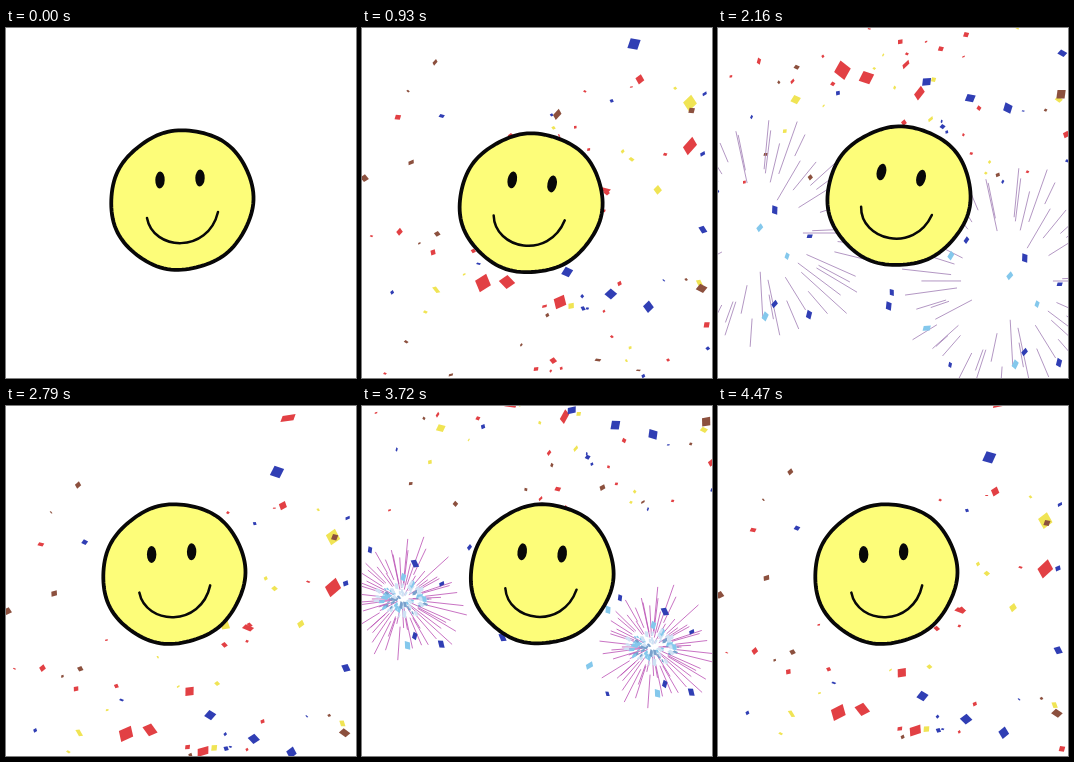
Animation, 350 px wide and 350 px high, one loop 4.5 s. Source, as an HTML page with a canvas:

```html
<!DOCTYPE html>
<html>
<head>
<meta charset="utf-8">
<title>Smiley party</title>
<style>
  html, body { margin: 0; width: 100%; height: 100%; overflow: hidden; background: #fff; }
  canvas { display: block; }
</style>
</head>
<body>
<canvas id="stage" width="350" height="350"></canvas>
<script>
const ctx = document.getElementById('stage').getContext('2d');
const LOOP = 4500, STEP = 30, SWAY = 1680, PARTY = 1720;
const TAU = Math.PI * 2;
const RED = [226, 64, 68], YELLOW = [240, 228, 84], BLUE = [48, 62, 180], BROWN = [140, 80, 62];
const SKY = [132, 200, 236], ICE = [206, 226, 244], STEEL = [120, 160, 204], DUST = [95, 75, 72];

const rgb = c => `rgb(${c.map(Math.round).join()})`;
const mix = (a, b, k) => a.map((v, i) => v + (b[i] - v) * k);
const clamp = v => Math.max(0, Math.min(1, v));
const polar = (a, r) => [Math.cos(a) * r, Math.sin(a) * r];

function seeded(seed) {
  return () => (seed = seed * 16807 % 2147483647) / 2147483647;
}
const make = (count, seed, build) => {
  const rand = seeded(seed);
  return Array.from({ length: count }, (_, i) => build(rand, i));
};

function flake(x, y, size, color, angle, flat) {
  ctx.save();
  ctx.translate(x, y);
  ctx.rotate(angle);
  ctx.transform(1, 0.15, -0.3, flat, 0, 0);
  ctx.fillStyle = rgb(color);
  ctx.fillRect(-size / 2, -size / 2, size, size);
  ctx.restore();
}

// Places are those at 930 ms into the party
const paper = (rand, x, y, size, color) => ({
  x, y, size, color,
  speed: 0.5 + size * 0.02 + y / 900,
  angle: rand() * 2 - 1, spin: rand() * 0.005, phase: rand() * TAU
});
const large = [[328, 118, 14, RED], [328, 75, 11, YELLOW], [272, 16, 10, BLUE], [283, -38, 13, RED],
  [121, 255, 13, RED], [145, 254, 11, RED], [198, 274, 11, RED], [243, 162, 9, RED]];
const confetti = [
  ...make(large.length, 11, (rand, i) => paper(rand, ...large[i])),
  ...make(85, 4242, (rand, i) => paper(rand, 350 * rand() ** 0.8, 350 * rand() ** 0.75,
    2.5 + 6 * rand() ** 2.5, [RED, BLUE, YELLOW, RED, BROWN][i % 5]))
];

function drawConfetti(p) {
  const u = p - 930, fall = 0.48 * u + 0.00013 * u * u;
  const scale = clamp((p - 100) / 150) * clamp((1640 - p) / 500);
  const dust = clamp((p - 1070) / 500);
  for (const c of confetti) {
    const flat = 0.35 + 0.65 * Math.abs(Math.cos(c.phase + u * c.spin));
    flake(c.x - u * 0.007, c.y + fall * c.speed, c.size * scale,
      mix(c.color, DUST, dust), c.angle + u * 0.001, flat);
  }
}

const rays = make(60, 77, (rand, i) => ({
  angle: TAU * (i + rand()) / 60, reach: 0.35 + 0.65 * rand(), start: rand(), life: 0.9 + rand()
}));
const sparks = make(75, 909, (rand, i) => ({
  angle: TAU * rand(), reach: Math.sqrt(rand()), size: 2 + 5 * rand(), color: [ICE, STEEL, ICE, SKY][i % 4]
}));
const shards = make(14, 31, (rand, i) => ({
  angle: TAU * rand(), reach: 15 + 95 * rand(), size: 4 + 4 * rand(),
  color: i % 3 ? BLUE : SKY, turn: rand() * 2
}));

function drawBurst(cx, cy, p) {
  if (p < 130 || p > 800) return;
  const grow = clamp((p - 130) / 150), late = Math.max(0, (p - 280) / 160);
  ctx.save();
  ctx.translate(cx, cy);

  ctx.lineWidth = 0.8;
  ctx.strokeStyle = rgb(mix([186, 80, 180], [160, 125, 180], clamp(late)));
  for (const { angle, reach, start, life } of rays) {
    if (late > life) continue;
    const outer = (68 * grow + 52 * late) * (reach + (1 - reach) * 0.5 * clamp(late));
    const inner = outer * (0.15 + 0.4 * start + 0.3 * clamp(late));
    const drop = 12 * late * late;
    const [x1, y1] = polar(angle, inner), [x2, y2] = polar(angle, outer);
    ctx.beginPath();
    ctx.moveTo(x1, y1 + drop);
    ctx.lineTo(x2, y2 + drop);
    ctx.stroke();
  }

  ctx.globalAlpha = clamp(1 - late * 1.1) * grow;
  for (const s of sparks) {
    const [x, y] = polar(s.angle, s.reach * (grow + late));
    flake(x * 28, y * 17, s.size, s.color, s.angle, 0.5);
  }

  ctx.globalAlpha = clamp((800 - p) / 200);
  for (const s of shards) {
    const [x, y] = polar(s.angle, s.reach * (grow + 0.3 * late));
    flake(x, y + 35 * late, s.size, s.color, s.turn + p * 0.003, 0.65);
  }
  ctx.restore();
}

// Sway: time, x, y, tilt in degrees
const poses = [
  [0, 176, 172, 0], [360, 180, 168, 6], [480, 181, 168, 11.5], [930, 169, 175, 8.7],
  [1110, 168, 168, -1], [1380, 182, 183, -8], [SWAY, 176, 172, 0]
];

function poseAt(t) {
  const i = poses.findIndex(q => q[0] > t), a = poses[i - 1], b = poses[i];
  const k = (t - a[0]) / (b[0] - a[0]);
  return mix(a, b, k * k * (3 - 2 * k)).slice(1);
}

// A circle, slightly stretched and wobbly as if drawn by hand
const outline = new Path2D();
for (let a = 0; a < TAU; a += TAU / 120) {
  outline.lineTo(...polar(a, 70.4 + 1.4 * Math.cos(2 * a - TAU * 5 / 6) + 0.4 * Math.cos(7 * a)));
}
outline.closePath();
const smile = new Path2D('M-35 18C-29 51 26 54 36 12');

function drawFace(t) {
  const [x, y, tilt] = poseAt(t);
  ctx.save();
  ctx.translate(x, y);
  ctx.rotate(tilt * Math.PI / 180);
  ctx.lineCap = 'round';
  ctx.fillStyle = '#fdfd79';
  ctx.strokeStyle = '#080808';
  ctx.fill(outline);
  ctx.lineWidth = 3.8;
  ctx.stroke(outline);
  ctx.lineWidth = 2.5;
  ctx.stroke(smile);
  ctx.fillStyle = '#080808';
  for (const [ex, ey] of [[-22, -20], [18, -22]]) {
    ctx.beginPath();
    ctx.ellipse(ex, ey, 4.7, 8.5, 0.03, 0, TAU);
    ctx.fill();
  }
  ctx.restore();
}

function draw() {
  const t = Math.floor(performance.now() % LOOP / STEP) * STEP, p = t % PARTY;
  ctx.fillStyle = '#fff';
  ctx.fillRect(0, 0, 350, 350);
  drawConfetti(p);
  drawBurst(40, 193, p);
  drawBurst(290, 241, p);
  drawFace(t % SWAY);
  requestAnimationFrame(draw);
}
draw();
</script>
</body>
</html>
```
